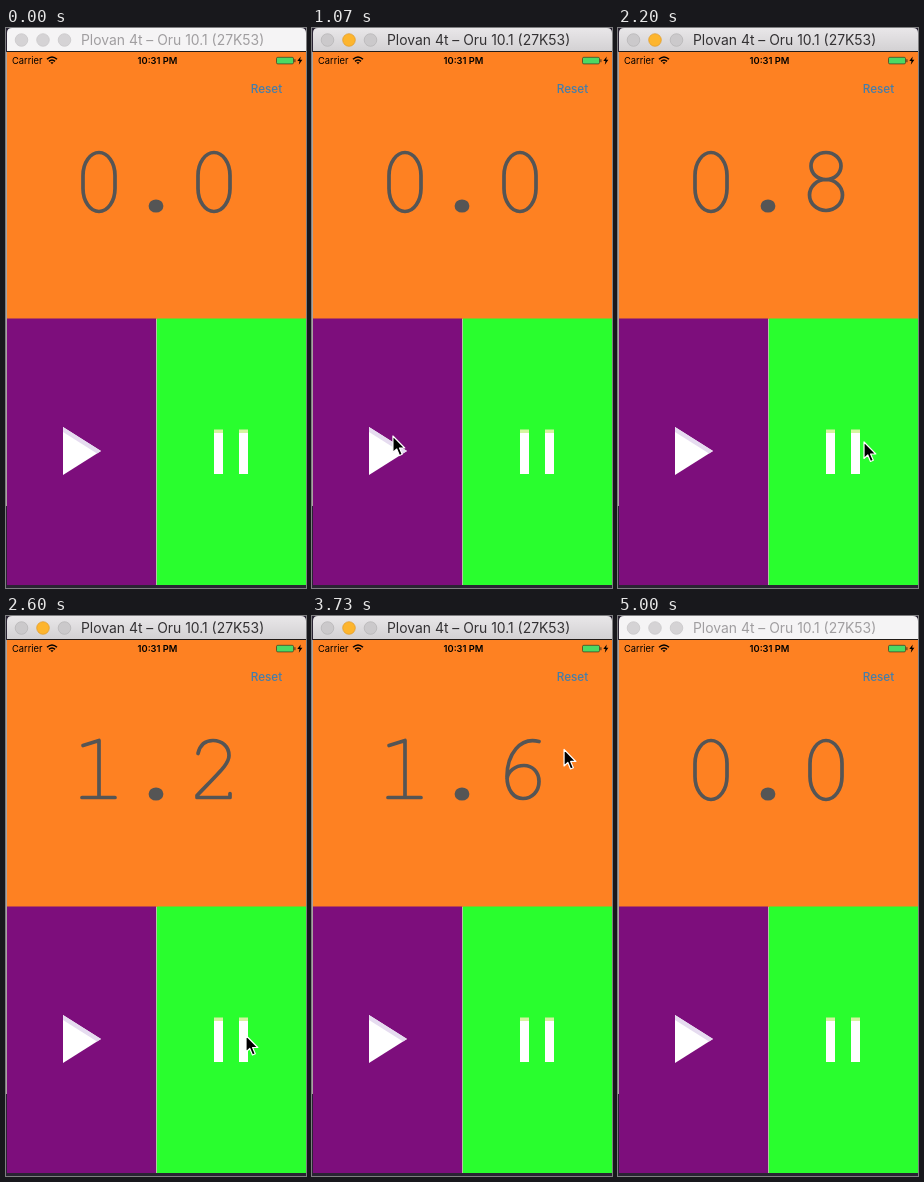
These frames come from a looping animation (300 by 560 pixels, 5070 ms). An HTML page:

```html
<!DOCTYPE html>
<html lang="en">
<head>
<meta charset="utf-8">
<title>Stopwatch</title>
<style>
  html, body { margin: 0; width: 100%; height: 100%; overflow: hidden; background: #24202c; }
  svg { display: block; width: 100%; height: 100%; font-family: Inter, Roboto, sans-serif; }
  .digit { fill: none; stroke: #555; stroke-width: 3.7; stroke-linecap: round; stroke-linejoin: round; }
</style>
</head>
<body>
<svg viewBox="0 0 300 560">
  <defs>
    <linearGradient id="bar" x2="0" y2="1">
      <stop stop-color="#e9e7e9"/><stop offset="1" stop-color="#d2d0d2"/>
    </linearGradient>
  </defs>

  <rect width="300" height="560" fill="#2a2433"/>
  <rect y="24" width="1" height="454" fill="#a9a3a0"/>

  <path id="titleBar" d="M1 24V5Q1 0 6 0H295Q300 0 300 5V24Z"/>
  <rect x="1" y="23" width="299" height="1" fill="#211a17"/>
  <g id="lights" stroke-width=".7">
    <circle cx="15.5" cy="12" r="6.3"/>
    <circle cx="37" cy="12" r="6.3"/>
    <circle cx="58.5" cy="12" r="6.3"/>
  </g>
  <text id="title" x="75" y="17" font-size="13.9">Plovan 4t – Oru 10.1 (27K53)</text>

  <rect x="1" y="24" width="299" height="267" fill="#fe8122"/>
  <rect x="1" y="290.5" width="149" height="266.5" fill="#7d0e7c"/>
  <rect x="151" y="290.5" width="149" height="266.5" fill="#29fe2e"/>
  <rect x="150" y="291" width="1" height="266" fill="#b4c4a4"/>

  <text x="6" y="36" font-size="9.3">Carrier</text>
  <g fill="none" stroke="#000" stroke-width="1.5">
    <path d="M41 31.3Q46 26.7 51 31.3M43 33.4Q46 30.6 49 33.4"/>
    <path d="M44.3 34.3L46 36.2L47.7 34.3Z" fill="#000" stroke="none"/>
  </g>
  <text x="151.5" y="36" font-size="9.3" font-weight="600" text-anchor="middle">10:31 PM</text>
  <rect x="270.5" y="29.3" width="17" height="6.6" rx="1.3" fill="#4cd964" stroke="#3a3320" stroke-width=".7"/>
  <rect x="288.4" y="31.2" width="1" height="3" fill="#3a3320"/>
  <path d="M294.7 28.5L291.3 33H293.5L292.8 36.7L296.4 31.8H294.2Z"/>
  <text id="reset" x="260.5" y="65" font-size="11.7" font-weight="500" text-anchor="middle">Reset</text>

  <g role="img" aria-label="Elapsed seconds">
    <path id="ones" class="digit" transform="translate(93 124.5)"/>
    <ellipse cx="150" cy="178" rx="7.4" ry="6.6" fill="#555"/>
    <path id="tenths" class="digit" transform="translate(208 124.5)"/>
  </g>

  <path d="M57 399L95 423L57 447Z" fill="#fff"/>
  <path d="M57 399L95 423L91 425.5L57 404Z" fill="#e6dcf0"/>
  <path d="M208 402h9v44h-9zM233 402h9v44h-9z" fill="#fff"/>
  <path d="M208 401.5h9v3.5h-9zM233 401.5h9v3.5h-9z" fill="#d5f5a0"/>

  <path id="cursor" d="M0 0V16.5L3.8 13L6.5 19.5L9.3 18.3L6.6 12H11.8Z"
        stroke="#fff" stroke-width="1.2" stroke-linejoin="round"/>
</svg>
<script>
const LOOP = 5070;
const ACTIVE = [70, 4930];
const START = 1370, PAUSE = 3000, RESET = 4200;

// Single-line numerals, 58 high and centred on x = 0
const DIGITS = [
  'M-16 23A16 23 0 0 1 16 23V36A16 23 0 0 1 -16 36Z',
  'M-16 5L0 0V57M-17 57H16',
  'M-16 13C-14 4 -8 0 -1 0C8 0 15 6 15 15C15 23 8 29 -17 55V57H16V53',
  'M-15 6C-11 2 -6 0 0 0C9 0 15 5 15 13C15 21 8 27 -3 27H0C11 27 18 33 18 42C18 52 11 58 0 58C-8 58 -14 56 -18 52',
  'M8 57V0H5L-16 39V41H15M-2 57H15',
  'M13 0H-12V27C-8 24 -4 22 1 22C11 22 17 29 17 39C17 50 10 58 -1 58C-8 58 -14 55 -18 51',
  'M19 1C0 -4 -13 14 -13 36C-13 50 -6 58 3 58C12 58 19 51 19 41C19 31 12 25 4 25C-5 25 -12 31 -13 38',
  'M-16 5V0H15V4L-1 57',
  'M0 0A15 13.5 0 0 1 0 27A15 13.5 0 0 1 0 0M0 27A16.5 15.5 0 0 1 0 58A16.5 15.5 0 0 1 0 27',
  'M-18 57C1 62 14 44 14 22C14 8 7 0 -2 0C-11 0 -18 7 -18 17C-18 27 -11 33 -3 33C6 33 13 27 14 20'
];

// time, x, y
const PATH = [
  [0, 110.5, 214], [560, 110.5, 214], [1130, 80, 414], [1730, 80, 414],
  [2150, 246, 414], [2250, 246, 414], [2450, 240, 419.5],
  [3230, 240, 419.5], [3930, 255, 63.5], [LOOP, 255, 63.5]
];

const $ = id => document.getElementById(id);
const clamp = v => Math.min(1, Math.max(0, v));
const smooth = v => v * v * (3 - 2 * v);
const mix = (a, b, k) => a + (b - a) * k;

function cursorAt(t) {
  const i = PATH.findIndex(p => p[0] > t);
  const [t0, x0, y0] = PATH[i - 1], [t1, x1, y1] = PATH[i];
  const k = smooth((t - t0) / (t1 - t0));
  return [mix(x0, x1, k), mix(y0, y1, k)];
}

function tenthsAt(t) {
  if (t < START || t >= RESET) return 0;
  return Math.floor((Math.min(t, PAUSE) - START) / 100);
}

function resetColor(t) {
  const k = t < RESET - 130 ? 0 : 1 - clamp((t - RESET - 70) / 300);
  const channels = [[66, 126], [126, 125], [172, 118]].map(([a, b]) => Math.round(mix(a, b, k)));
  return `rgb(${channels})`;
}

function draw(t) {
  const active = t >= ACTIVE[0] && t < ACTIVE[1];
  $('titleBar').setAttribute('fill', active ? 'url(#bar)' : '#f5f4f5');
  $('title').setAttribute('fill', active ? '#333133' : '#a09ea0');
  [...$('lights').children].forEach((light, i) => {
    const amber = active && i === 1;
    light.setAttribute('fill', amber ? '#fdb52e' : active ? '#cbc9cb' : '#d5d3d5');
    light.setAttribute('stroke', amber ? '#dd9a2b' : active ? '#b5b3b5' : '#c8c6c8');
  });

  const count = tenthsAt(t);
  $('ones').setAttribute('d', DIGITS[Math.floor(count / 10)]);
  $('tenths').setAttribute('d', DIGITS[count % 10]);
  $('reset').setAttribute('fill', resetColor(t));

  $('cursor').setAttribute('visibility', active ? 'visible' : 'hidden');
  $('cursor').setAttribute('transform', `translate(${cursorAt(t)})`);
}

const begin = performance.now();
function tick() {
  draw((performance.now() - begin) % LOOP);
  requestAnimationFrame(tick);
}
tick();
</script>
</body>
</html>
```
